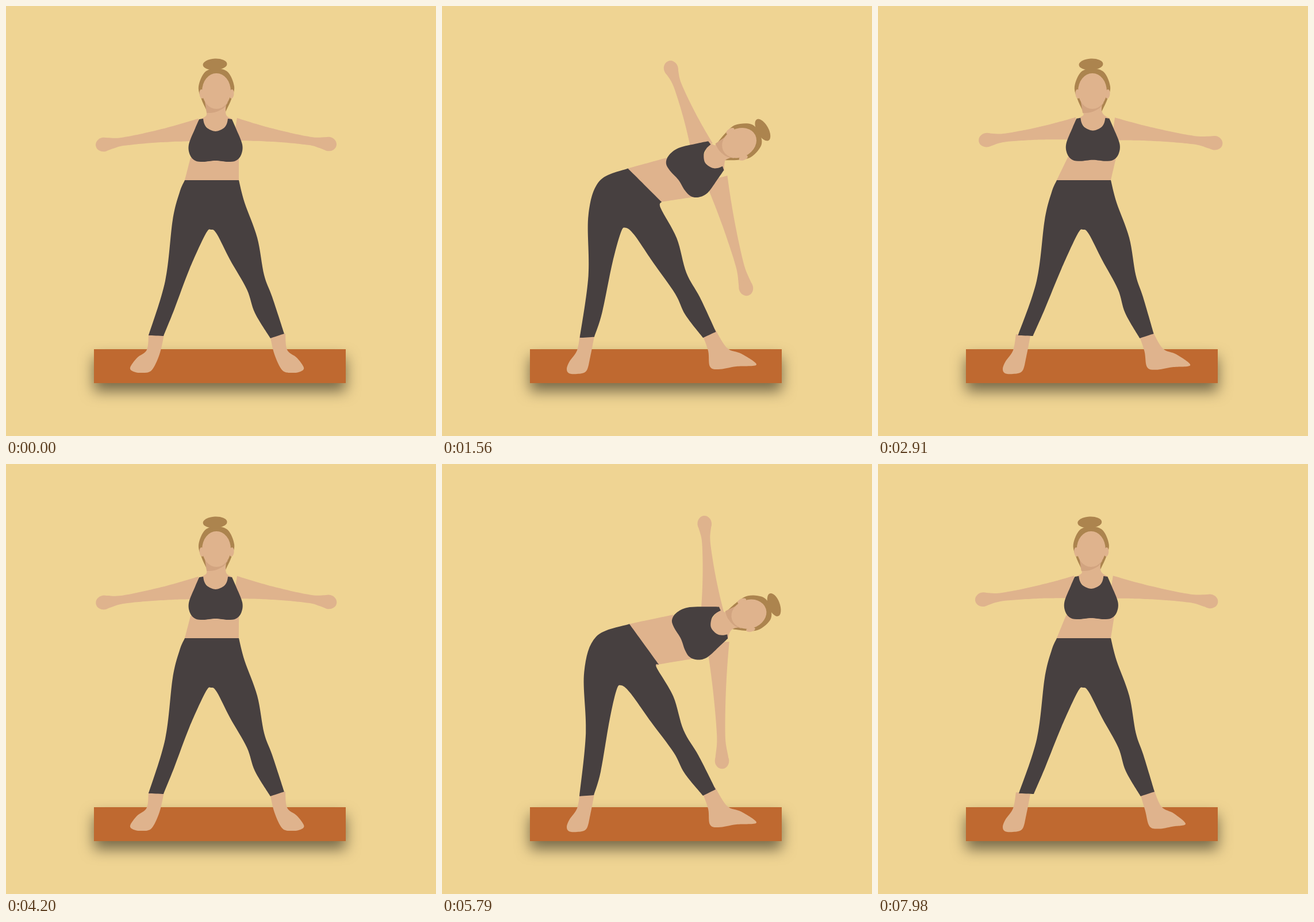
Recreate the animation shown at these times as an HTML page with a canvas. Size 748 by 748 pixels, loop 8 s.

```html
<!DOCTYPE html>
<html lang="en">
<head>
<meta charset="utf-8">
<title>Triangle pose</title>
<style>
html, body { margin: 0; width: 100%; height: 100%; overflow: hidden; background: #efd493; }
canvas { display: block; width: 100vw; height: 100vh; }
</style>
</head>
<body>
<canvas id="stage" width="748" height="748"></canvas>
<script>
const ctx = document.getElementById('stage').getContext('2d');
const SKIN = '#dfb38d', SHADE = '#d2a480', HAIR = '#ac844e', CLOTH = '#474040';
const LOOP = 8000, CYCLE = 3570, START = 510, STEP = 30;
const RAD = Math.PI / 180;

// "x,y" pairs; a trailing ! marks a sharp corner
const parse = text => text.trim().split(/\s+/).map(s => {
  const [x, y] = s.replace('!', '').split(',').map(Number);
  return { x, y, corner: s.endsWith('!') };
});
const mix = (a, b, t) => a + (b - a) * t;
const blend = (a, b, t) => a.map((p, i) =>
  ({ x: mix(p.x, b[i].x, t), y: mix(p.y, b[i].y, t), corner: p.corner }));
const flip = (pts, axis) => pts.map(p => ({ ...p, x: 2 * axis - p.x }));
const turn = (p, deg) => {
  const c = Math.cos(deg * RAD), s = Math.sin(deg * RAD);
  return { ...p, x: p.x * c - p.y * s, y: p.x * s + p.y * c };
};
const shift = (p, x, y) => ({ ...p, x: p.x + x, y: p.y + y });

// Whole outline from its right half; the first and last points lie on the axis
const symmetric = (half, axis) => [...half, ...flip(half.slice(1, -1), axis).reverse()];

// Closed smooth curve through the points, broken at corners
function fillShape(pts, color) {
  const n = pts.length, at = i => pts[(i + n) % n];
  ctx.beginPath();
  ctx.moveTo(pts[0].x, pts[0].y);
  for (let i = 0; i < n; i++) {
    const b = at(i), c = at(i + 1);
    const a = b.corner ? b : at(i - 1), d = c.corner ? c : at(i + 2);
    ctx.bezierCurveTo(b.x + (c.x - a.x) / 6, b.y + (c.y - a.y) / 6,
      c.x - (d.x - b.x) / 6, c.y - (d.y - b.y) / 6, c.x, c.y);
  }
  ctx.closePath();
  ctx.fillStyle = color;
  ctx.fill();
}
function fillOval(x, y, rx, ry, color, deg = 0) {
  ctx.beginPath();
  ctx.ellipse(x, y, rx, ry, deg * RAD, 0, 7);
  ctx.fillStyle = color;
  ctx.fill();
}

// Key outlines, standing and bent
const CROTCH = 12;
const pantsRest = parse(`311,303! 405,303! 415,342 437,403 449,468 463,506 484,570! 460,578!
  433,534 419,493 390,442 367,397 357,389 347,397 319,458 293,527 274,574! 248,573!
  277,478 290,372 302,324`);
const pantsBent = parse(`326,278! 377,349! 373,354 402,404 420,463 446,507 476,566! 454,577!
  422,538 403,502 363,448 327,398 311,385 303,394 291,447 276,535 264,576! 239,578!
  250,468 247,362 268,300`);
const footRest = parse('248,570! 275,572! 267,606 253,634 235,638 222,636 216,629 228,612 245,598');
const footLeft = parse('240,571! 265,574! 258,610 251,635 235,640 221,639 217,631 222,618 235,599');
const footRight = parse('475,562! 453,572! 463,600 466,627 481,632 512,627 547,624 521,605 496,595');
const shirt = symmetric(parse(`364.5,218 378,213 384,205 386,196! 393,197! 400,213 411,241
  409,259 400,269 386,271 364.5,269`), 364.5);
const hair = symmetric(parse('366,109 386,115 397,140 392,162 382,184! 366,184'), 366);
const shade = parse('345,160! 349,186! 363,185 378,178 386,168!');

// Joint positions: rest, shifted, tilting, nearly down, down
const joints = {
  head: parse('366,148 374,148 407.5,156.5 517,238 534.5,262'),
  chest: parse('364.25,232.5 375,231 392.5,241 444.25,280.75 453.25,289.75'),
  shoulderL: parse('328,217 339,214 354,214 449,238 470,250'),
  handL: parse('170,241 192,232 205,200 398,109 459,104'),
  shoulderR: parse('408,216 421,215 433,231 480,311 480,322'),
  handR: parse('561,240 589,238 592,288 529,490 485,517')
};
const KEYS = [0, 0.15, 0.82, 1];
const CHEST_TURN = 70, HEAD_TURN = [0, 10.5, 64, 73];

// Cubic through the four key values
const through = (vals, k) => vals.reduce((sum, v, i) =>
  sum + KEYS.reduce((w, q, m) => m === i ? w : w * (k - q) / (KEYS[i] - q), v), 0);

function joint(name, step, tilt) {
  const [rest, ...keys] = joints[name];
  const axis = a => through(keys.map(p => p[a]), tilt) + (rest[a] - keys[0][a]) * (1 - step);
  return { x: axis('x'), y: axis('y') };
}

// Oval hand, narrow wrist, arm widening towards the shoulder
const armWidth = t => 6.5 + 12 * t * t + 5 * Math.exp(-((t / 0.12) ** 2));

function drawArm(hand, shoulder) {
  const dx = shoulder.x - hand.x, dy = shoulder.y - hand.y, len = Math.hypot(dx, dy);
  const edge = side => Array.from({ length: 25 }, (_, i) => {
    const t = i / 24 * 1.06, w = side * armWidth(t) / len;
    return { x: hand.x + dx * t - dy * w, y: hand.y + dy * t + dx * w, corner: i % 24 === 0 };
  });
  fillShape([...edge(1), ...edge(-1).reverse()], SKIN);
  fillOval(hand.x, hand.y, 14, 12.3, SKIN, Math.atan2(dy, dx) / RAD);
}

function drawMat() {
  ctx.fillStyle = '#efd493';
  ctx.fillRect(0, 0, 748, 748);
  ctx.save();
  ctx.shadowColor = 'rgba(0,0,0,0.5)';
  ctx.shadowBlur = 24;
  ctx.shadowOffsetY = 14;
  ctx.fillStyle = '#bf6930';
  ctx.fillRect(153, 597, 438, 59);
  ctx.restore();
}

function drawFigure(step, tilt) {
  const at = name => joint(name, step, tilt);
  const chest = at('chest'), chestRest = joints.chest[0];
  const head = at('head'), headRest = joints.head[0], headTurn = through(HEAD_TURN, tilt);

  // Bending stretches the outer side of the chest
  const onChest = p => {
    const x = p.x - chestRest.x, y = p.y - chestRest.y;
    const bent = { ...p, x, y: y * (1 + tilt * (0.1 - x / 400)) };
    return shift(turn(bent, tilt * CHEST_TURN), chest.x, chest.y);
  };
  const onHead = p =>
    shift(turn(shift(p, -headRest.x, -headRest.y), headTurn), head.x, head.y);
  const headOval = (x, y, rx, ry, color, deg = 0) => {
    const c = onHead({ x, y });
    fillOval(c.x, c.y, rx, ry, color, deg + headTurn);
  };

  drawArm(at('handL'), at('shoulderL'));
  drawArm(at('handR'), at('shoulderR'));

  const stance = pantsRest.map(p => shift(p, -5 * step * Math.max(0, (p.y - 450) / 120), 0));
  const legs = blend(stance, pantsBent, tilt);
  const ribs = parse('321,264 405,264').map(onChest);
  fillShape([...ribs, legs[1], legs[CROTCH], legs[0]].map(p => ({ ...p, corner: true })), SKIN);
  fillShape(blend(footRest, footLeft, Math.min(1, step * 1.75)), SKIN);
  fillShape(blend(flip(footRest, 367), footRight, step), SKIN);
  fillShape(legs, CLOTH);

  headOval(363.5, 101.5, 21, 10, HAIR, -3);
  fillShape(hair.map(onHead), HAIR);
  fillShape([
    ...parse('349,165! 349,183').map(onHead),
    ...parse('348,191 338,197! 367,225 394,197! 384,191').map(onChest),
    ...parse('382,181 384,165!').map(onHead)
  ], SKIN);
  fillShape(shade.map(onHead), SHADE);
  headOval(340.5, 153, 4, 8, SKIN, -6);
  headOval(392.5, 153, 4, 8, SKIN, 6);
  headOval(366, 148, 25, 31, SKIN);
  fillShape(shirt.map(onChest), CLOTH);
}

function ease(now, from, span) {
  const x = Math.min(1, Math.max(0, (now - from) / span));
  return x < 0.5 ? 8 * x ** 4 : 1 - 8 * (1 - x) ** 4;
}

function draw(now) {
  const t = Math.floor(now % LOOP / STEP) * STEP;
  const u = (t - START + CYCLE) % CYCLE;
  const step = ease(u, 0, 630) - ease(u, 2178, 622);
  const tilt = ease(u, 671, 618) - ease(u, 1610, 580);
  drawMat();
  drawFigure(step, tilt);
}

const begin = performance.now();
function tick() {
  draw(performance.now() - begin);
  requestAnimationFrame(tick);
}
tick();
</script>
</body>
</html>
```
